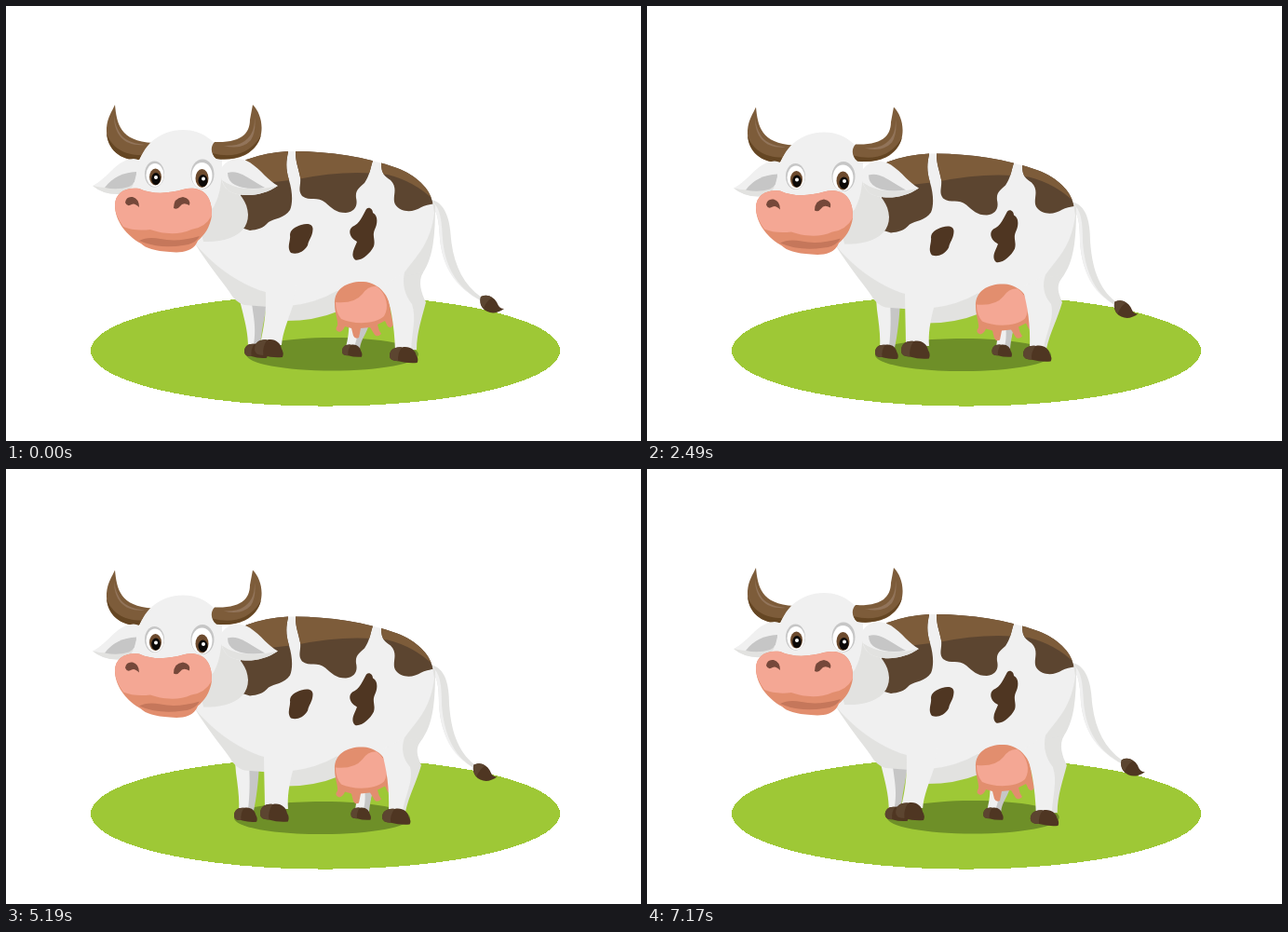
Animation, 682 px wide and 467 px high, one loop 7.2 s. Source, as an HTML page:

```html
<!DOCTYPE html>
<html lang="en">
<head>
<meta charset="utf-8">
<title>Cow</title>
<style>
html, body { margin: 0; width: 100%; height: 100%; overflow: hidden; background: #fff; }
svg { display: block; width: 682px; height: 467px; }
.light { fill: #f0f0f0; }
.shade { fill: #e2e2e0; }
.grey { fill: #c6c6c6; }
.brown { fill: #5c4530; }
.tan { fill: #7d5c3a; }
.dark { fill: #4f3622; }
.pink { fill: #f4a794; }
.coral { fill: #e28e6e; }
</style>
</head>
<body>
<svg viewBox="0 0 682 467">
  <defs>
    <g id="hoof">
      <path class="dark" d="M0 11C0 4 5 0 13 1C21 -1 27 4 28 10Q31 15 29 19Q19 20 9 17Q0 17 0 11Z"/>
      <path class="brown" d="M0 11C0 4 5 0 13 1Q8 8 9 17Q0 17 0 11Z"/>
    </g>
    <path id="patches" d="M252 190L256 150H303V157C301 166 300 174 304 187C308 200 308 212 305 219C299 228 288 228 282 232C276 239 270 240 262 241L252 238Z
      M311 150V157C311 168 314 173 316 184C317 193 313 198 318 204C326 210 335 204 343 211C350 217 354 222 365 222C375 221 378 214 376 206C375 197 380 195 385 190C391 181 391 175 394 166V150Z
      M403 150V169C403 180 407 183 413 187C422 196 414 205 418 213C424 222 437 222 446 216Q452 213 462 212V150Z"/>
    <path id="trunk" d="M203 255C222 278 250 299 279 307L304 322Q333 319 355 306L424 318C428 306 421 296 428 286C440 269 456 256 460 222L458 210C455 196 441 182 420 174C385 161 340 155 303 156Q280 157 258 165L220 200Z"/>
    <clipPath id="onTrunk"><use href="#trunk"/></clipPath>
    <clipPath id="onPatch"><use href="#patches"/></clipPath>
  </defs>

  <ellipse cx="343" cy="370" rx="252" ry="59.6" fill="#9ec836" shape-rendering="crispEdges"/>
  <path fill="#6e8f28" d="M258 374C258 364 299 356 350.500 356C402 356 443 364 443 374C443 384 402 391.500 350.500 391.500C299 391.500 258 384 258 374Z"
    data-to="M245 374.500C245 364.500 287 357 339.500 357C392 357 434 364.500 434 374.500C434 384.500 392 392 339.500 392C287 392 245 384.500 245 374.500Z"/>

  <!-- tail -->
  <path class="shade" d="M457 208C471 211 477 228 478 250C481 280 493 302 514 315L511 317C485 303 469 282 466 250C465 230 463 218 456 214Z"
    data-to="M457 210.500C471 213.500 476 230 476 252C478 284 487 307 507 320L504 322C480 308 467 286 465 253C465 233 463 221 456 216.500Z"/>
  <path class="light" d="M457 210C466 215 468 228 469 250C471 278 484 301 505 313C483 301 469 281 466 250C465 230 463 218 456 214Z"
    data-to="M457 212.500C466 217.500 468 231 468 253C470 282 480 306 498 318C478 306 467 284 465 253C465 233 463 221 456 216.500Z"/>
  <g data-move="-7.500 5.500">
    <path class="dark" d="M510 312C518 308 526 314 528 320Q530 325 535 325Q525 332 517 328C510 325 508 318 510 312Z"/>
    <path class="brown" d="M510 312Q517 309 522 313Q515 318 513 325Q508 319 510 312Z"/>
  </g>

  <!-- far legs -->
  <path class="light" d="M250 312L253 324C257 340 260 352 260 366L272 366L274 312Z"
    data-to="M246 314L247 326C249 341 251 354 250 367L262 367L268 314Z"/>
  <path class="grey" d="M263 312C266 335 269 345 266 364L273 365C274 350 278 335 281 314Z"
    data-to="M261 314C262 337 262 347 260 366L266 367C269 352 271 337 272 316Z"/>
  <g data-move="-11 1"><use href="#hoof" transform="translate(256 362) scale(.83)"/></g>
  <path class="light" d="M368 335C369 350 367 357 365 367L379 368C380 357 386 352 391 338Z"
    data-to="M377 337C378 352 376 357 375 367L389 368C390 357 393 352 394 340Z"/>
  <path class="grey" d="M378 338C379 350 377 357 374 366L380 368C381 357 388 352 391 338Z"
    data-to="M385 340C386 352 386 357 384 366L390 368C391 357 393 352 394 340Z"/>
  <g data-move="9.500 0"><use href="#hoof" transform="translate(361 363) scale(.72)"/></g>

  <!-- trunk -->
  <g class="bob">
    <path class="shade" d="M203 255C215 275 230 293 240 307Q246 318 256 321L282 323L300 338Q332 338 356 328L425 322L438 300L448 286C460 268 461 240 461 214L440 195L260 200Z"/>
    <use href="#trunk" class="light"/>
    <g clip-path="url(#onTrunk)">
      <use href="#patches" class="brown"/>
      <path class="tan" clip-path="url(#onPatch)" d="M240 140H470V220Q446 190 410 181Q365 175 313 186L288 189L240 194Z"/>
    </g>
    <path class="dark" d="M317 235C324 233 330 234 329.500 240C329 248 325 251 324 257C319 265 312 267 306 265C301 259 306 252 305 246C305 240 311 237 317 235Z"/>
    <path class="dark" d="M387 218C390 215 394 218 394 222C400 225 399 234 396 240C393 247 397 251 395 258C391 266 382 274 375 272.500C369 267 375 259 377 253C369 249 367 241 372 237C380 234 383 225 387 218Z"/>
    <path class="coral" d="M353 320C352 302 369 295 384 296C401 297 413 312 413 328L416 342Q414 347 410 344L407 338L399 342Q400 348 403 352Q399 356 396 353L391 345L381 346L379 356Q375 358 373 354L371 346L364 344Q362 349 358 350Q352 348 356 343C357 338 353 330 353 320Z"/>
    <path class="pink" d="M354 318Q374 320 383 309Q389 300 398 301C409 309 412 324 406 333C396 342 373 342 360 336Q354 329 354 318Z"/>
  </g>

  <!-- near legs -->
  <path class="light" d="M278 295C281 325 277 345 273 363L296 364C297 351 303 337 308 322L312 295Z"
    data-to="M277 297C277 327 278 347 278 364L303 365C302 352 304 339 308 324L312 297Z"/>
  <g data-move="6 1.500"><use href="#hoof" transform="translate(267 357.500) scale(1.03)"/></g>
  <path class="shade" d="M428 290L448 286C442 296 446 308 451 318C447 334 441 350 441 369L426 370L424 315Z"
    data-to="M427 292L448 288.500C438 300 442 308 446 318C441 336 433 350 429 368L418 369L420 317Z"/>
  <path class="light" d="M406 300C413 320 417 342 418 370L435 370C436 350 441 335 436 320Q424 305 428 286Z"
    data-to="M403 302C409 322 412 343 411 368L426 368C429 349 438 335 434 320Q422 306 428 288.500Z"/>
  <g data-move="-8 -1.500"><use href="#hoof" transform="translate(412 365.500) scale(1.02 .92)"/></g>

  <!-- head -->
  <g class="bob">
    <path class="shade" d="M224 172C240 195 259 202 260 224C260 243 242 254 212 253L205 220Z"/>
    <path class="tan" d="M117 106C119 126 122 145 158 147C151 151 147 158 143 165C122 167 107 152 108 131C109 119 114 113 117 106Z"/>
    <path fill="#654623" d="M108 136C113 152 127 160 145 160L143 165C124 166 109 155 108 136Z"/>
    <path fill="#92745a" d="M116 118C116 139 128 151 149 149Q128 147 122 136Q117 128 116 118Z"/>
    <path class="light" d="M93 193C111 184 118 165 137 164Q150 165 147 180Q143 198 130 201Q108 205 93 193Z"/>
    <path class="shade" d="M93 193Q111 198 137 191Q134 200 122 202Q105 203 93 193Z"/>
    <path class="grey" d="M106 195Q118 179 140 178Q141 190 132 194Q120 198 106 195Z"/>
    <path class="light" d="M230 176C236 164 250 161 262 168C274 176 282 188 292 193C276 204 254 206 240 199Q230 192 230 176Z"/>
    <path class="shade" d="M292 193C276 204 254 206 240 199Q234 194 232 187Q253 202 292 193Z"/>
    <path class="grey" d="M238 179C250 175 262 186 278 195Q258 198 246 192Q238 188 238 179Z"/>
    <path class="light" d="M142 174C145 150 165 133 190 133C211 133 228 146 232 163C232 186 231 201 223 216L205 232H132Q135 195 142 174Z"/>
    <path class="tan" d="M265 106C273 114 277 128 273 142C267 159 248 167 226 164C220 160 219 151 224 146C248 147 262 140 262 122Z"/>
    <path fill="#654623" d="M222 158C244 164 264 158 274 138C269 158 248 167 226 164Q223 162 222 158Z"/>
    <path fill="#92745a" d="M267 119C268 141 255 151 234 150Q253 155 263 144Q269 134 267 119Z"/>
    <g id="eyes">
      <ellipse cx="159.500" cy="180.500" rx="10.500" ry="14" class="grey"/>
      <ellipse cx="160" cy="181.500" rx="9.500" ry="12.500" fill="#fff"/>
      <ellipse cx="160.500" cy="183.500" rx="6.500" ry="9" fill="#6d4b2e"/>
      <ellipse cx="161" cy="185.500" rx="4.800" ry="6.500" fill="#0c0907"/>
      <circle cx="161" cy="184" r="2" fill="#fff"/>
      <ellipse cx="211" cy="180.500" rx="12.500" ry="16" class="grey"/>
      <ellipse cx="210.500" cy="182" rx="11" ry="14" fill="#fff"/>
      <ellipse cx="210.500" cy="185" rx="7" ry="10" fill="#6d4b2e"/>
      <ellipse cx="211.500" cy="187.500" rx="5" ry="6.500" fill="#0c0907"/>
      <circle cx="212" cy="185.500" r="2" fill="#fff"/>
    </g>
    <path class="coral" d="M117 214C117 200 129 194 143 196C158 203 176 201 190 197C206 193 222 199 221 225C219 238 213 246 206 252C201 265 186 265 176 264C160 263 150 260 145 255C130 247 117 231 117 214Z"/>
    <path class="pink" d="M117 214C117 200 129 194 143 196C158 203 176 201 190 197C206 193 222 199 221 225Q214 238 199 240C184 247 166 244 155 240Q138 242 126 237Q117 225 117 214Z"/>
    <path fill="#c5775b" d="M143 252Q152 247 166 250Q184 254 208 247Q203 256 190 257Q164 261 143 252Z"/>
    <path fill="#75483a" d="M128 211Q129 204 136 205Q143 207 143 216Q138 211 135 213Q130 216 128 211Z"/>
    <path fill="#75483a" d="M180 217Q180 206 190 205Q199 207 197 214Q190 210 187 215Q184 219 180 217Z"/>
  </g>
</svg>
<script>
const PERIOD = 900, STEP = 30, DROP = 2.5;
const all = selector => [...document.querySelectorAll(selector)];
const numbers = text => text.match(/-?[\d.]+/g).map(Number);

const bobs = all('.bob');
const movers = all('[data-move]').map(el => ({ el, by: numbers(el.dataset.move) }));
const morphs = all('[data-to]').map(el => ({
  el, from: el.getAttribute('d'), to: numbers(el.dataset.to)
}));

const shift = (el, x, y) => el.setAttribute('transform', `translate(${x} ${y})`);

function draw(now) {
  const t = Math.floor(now / STEP) * STEP % PERIOD;
  // swing is 0 at one end of the stride, 1 with the legs nearly upright
  const swing = (1 - Math.cos(2 * Math.PI * t / PERIOD)) / 0.895;
  bobs.forEach(el => shift(el, 0, DROP * swing));
  movers.forEach(({ el, by: [x, y] }) => shift(el, x * swing, y * swing));
  morphs.forEach(({ el, from, to }) => {
    let i = 0;
    el.setAttribute('d', from.replace(/-?[\d.]+/g, n => +n + (to[i++] - n) * swing));
  });
}

const start = performance.now();
function tick() {
  draw(performance.now() - start);
  requestAnimationFrame(tick);
}
draw(0);
requestAnimationFrame(tick);
</script>
</body>
</html>
```
